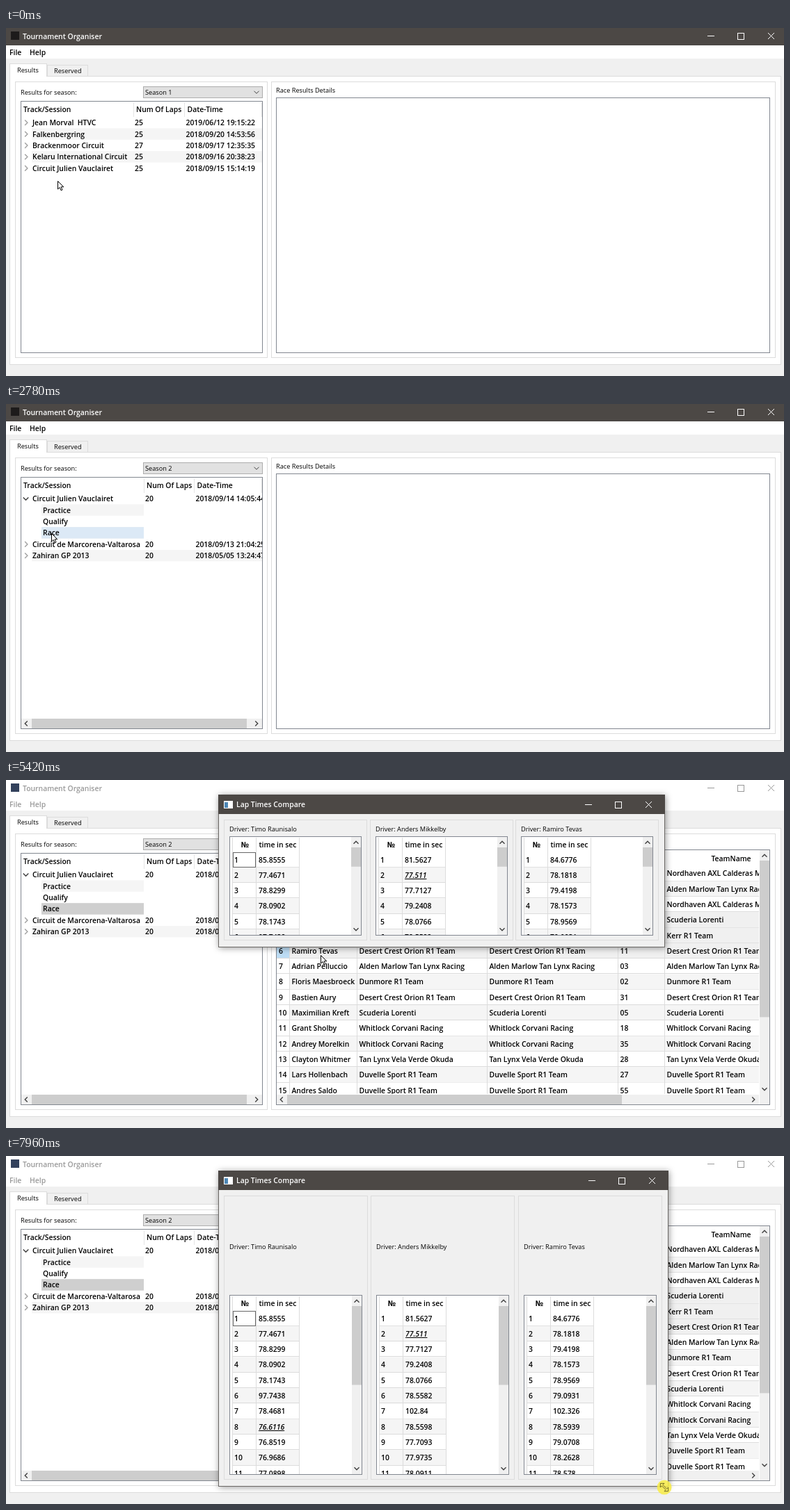
These frames come from a looping animation (1118 px wide and 501 px high, 8000 ms). An HTML page with a canvas:

```html
<!DOCTYPE html>
<html lang="en">
<head>
<meta charset="utf-8">
<title>Race results</title>
<style>
html, body { margin: 0; width: 100%; height: 100%; overflow: hidden; background: #f0f0f0; }
canvas { display: block; }
</style>
</head>
<body>
<canvas id="stage" width="1118" height="501"></canvas>
<script>
const ctx = document.getElementById('stage').getContext('2d');
const LOOP = 8000;
const BLUE = '#0078d7', FRAME = '#828790', GRID = '#dcdcdc', BAR = '#4c4845', ALT = '#f5f5f5', FACE = '#f0f0f0';
const UI = '600 10.4px "Open Sans", "Noto Sans", sans-serif';
const BOLD = '700 11px "Open Sans", "Noto Sans", sans-serif';
const FAST = 'italic ' + UI;
const SMALL = '9.2px "Open Sans", "Noto Sans", sans-serif';

// Moments of the hard changes
const AT = { popup: 840, season2: 1380, expand: 2240, results: 3030, select: 3580,
  menu: 4740, dialog: 5120, sideCursor: 6300, cornerCursor: 6800, drag: 7200 };

// Keys: time, x, y
const CURSOR = [[0, 74, 220], [70, 74, 220], [500, 150, 148], [765, 208, 92], [920, 208, 98], [1070, 209, 117],
  [1380, 210, 117], [1920, 26, 134], [2480, 26, 134], [2780, 65, 186], [2980, 65, 186], [3260, 458, 226],
  [3410, 418, 214], [3580, 418, 205], [3880, 409, 240], [4430, 409, 240], [4700, 450, 220], [4960, 455, 224],
  [5660, 450, 267], [5890, 450, 267], [6350, 949, 239], [6730, 949, 239], [6890, 941, 242]];
const CORNER = [[7200, 946, 240], [7430, 925, 360], [7700, 957, 430], [7960, 951, 475]];

const SEASON1 = [['Jean Morval  HTVC', 25, '2019/06/12 19:15:22'], ['Falkenbergring', 25, '2018/09/20 14:53:56'],
  ['Brackenmoor Circuit', 27, '2018/09/17 12:35:35'], ['Kelaru International Circuit', 25, '2018/09/16 20:38:23'],
  ['Circuit Julien Vauclairet', 25, '2018/09/15 15:14:19']];
const SEASON2 = [['Circuit Julien Vauclairet', 20, '2018/09/14 14:05:44'],
  ['Circuit de Marcorena-Valtarosa', 20, '2018/09/13 21:04:25'], ['Zahiran GP 2013', 20, '2018/05/05 13:24:47']];
const SESSIONS = ['Practice', 'Qualify', 'Race'];

const TEAMS = { n: 'Nordhaven AXL Calderas Motorsport', a: 'Alden Marlow Tan Lynx Racing', s: 'Scuderia Lorenti',
  k: 'Kerr R1 Team', o: 'Desert Crest Orion R1 Team', d: 'Dunmore R1 Team', w: 'Whitlock Corvani Racing',
  t: 'Tan Lynx Vela Verde Okuda', v: 'Duvelle Sport R1 Team' };
const DRIVERS = `Ellis Hartwood,n,44|Jan Oosterveen,a,33|Juhana Lehtola,n,77|Timo Raunisalo,s,07|Anders Mikkelby,k,20
|Ramiro Tevas,o,11|Adrian Pelluccio,a,03|Floris Maesbroeck,d,02|Bastien Aury,o,31|Maximilian Kreft,s,05|Grant Sholby,w,18
|Andrey Morelkin,w,35|Clayton Whitmer,t,28|Lars Hollenbach,v,27|Andres Saldo,v,55`.split('|').map(row => row.trim().split(','));
const LAPS = [
  '85.8555 77.4671 78.8299 78.0902 78.1743 97.7438 78.4681 76.6116 76.8519 76.9686 77.0898',
  '81.5627 77.511 77.7127 79.2408 78.0766 78.5582 102.84 78.5598 77.7093 77.9735 78.0911',
  '84.6776 78.1818 79.4198 78.1573 78.9569 79.0931 102.326 78.5939 79.0708 78.2628 78.578'
].map(list => list.split(' '));
const FASTEST = ['76.6116', '77.511', ''];

function at(keys, t) {
  let i = keys.findIndex(key => key[0] > t);
  if (i < 0) return keys[keys.length - 1].slice(1);
  if (i === 0) return keys[0].slice(1);
  const [t0, x0, y0] = keys[i - 1], [t1, x1, y1] = keys[i];
  const k = (t - t0) / (t1 - t0);
  return [x0 + (x1 - x0) * k, y0 + (y1 - y0) * k];
}

function fill(x, y, w, h, color) {
  ctx.fillStyle = color;
  ctx.fillRect(x, y, w, h);
}

function box(x, y, w, h, border, color) {
  if (color) fill(x, y, w, h, color);
  ctx.strokeStyle = border;
  ctx.lineWidth = 1;
  ctx.strokeRect(Math.round(x) + .5, Math.round(y) + .5, Math.round(w) - 1, Math.round(h) - 1);
}

function poly(points, color, width = 1) {
  ctx.beginPath();
  points.forEach(p => ctx.lineTo(...p));
  ctx.strokeStyle = color;
  ctx.lineWidth = width;
  ctx.stroke();
}

// Text centred vertically on y
function text(string, x, y, color = '#000', font = UI, align = 'left') {
  ctx.font = font;
  ctx.fillStyle = color;
  ctx.textAlign = align;
  ctx.fillText(string, x, y + (font === SMALL ? 3.3 : 3.8));
}

function clipped(x, y, w, h, paint) {
  ctx.save();
  ctx.beginPath();
  ctx.rect(x, y, w, h);
  ctx.clip();
  paint();
  ctx.restore();
}

function shadowed(x, y, w, h, color, blur, offset) {
  ctx.save();
  ctx.shadowColor = 'rgba(0,0,0,.4)';
  ctx.shadowBlur = blur;
  ctx.shadowOffsetX = ctx.shadowOffsetY = offset;
  fill(x, y, w, h, color);
  ctx.restore();
}

function chevron(x, y, angle, color = '#404040', size = 3.5, width = 1.4) {
  ctx.save();
  ctx.translate(x, y);
  ctx.rotate(angle * Math.PI / 2);
  poly([[-size / 2, -size], [size / 2, 0], [-size / 2, size]], color, width);
  ctx.restore();
}

function hScroll(x, y, w, from, to) {
  fill(x, y, w, 14, FACE);
  fill(from, y, to - from, 14, '#cdcdcd');
  chevron(x + 7, y + 7, 2);
  chevron(x + w - 8, y + 7, 0);
}

function vScroll(x, y, h, part) {
  fill(x, y, 14, h, FACE);
  fill(x, y + 15, 14, (h - 30) * part, '#cdcdcd');
  chevron(x + 7, y + 8, 3);
  chevron(x + 7, y + h - 8, 1);
}

function windowButtons(right, y, color) {
  fill(right - 114, y, 10, 1, color);
  box(right - 71, y - 4, 10, 10, color);
  poly([[right - 27, y - 4], [right - 18, y + 5]], color);
  poly([[right - 18, y - 4], [right - 27, y + 5]], color);
}

function drawWindow(active) {
  const ink = active ? '#fff' : '#999';
  fill(0, 0, 1118, 501, FACE);
  fill(0, 0, 1118, 25, active ? BAR : '#fff');
  fill(7, 5, 12, 12, active ? '#1d1b1b' : '#33415c');
  text('Tournament Organiser', 24, 12, ink);
  windowButtons(1122, 11, ink);
  fill(0, 25, 1118, 19, '#fff');
  text('File', 5, 35.5, active ? '#000' : '#999');
  text('Help', 34, 35.5, active ? '#000' : '#999');
  box(5, 69, 1109, 416, GRID, '#fff');
  box(59, 53, 59, 17, GRID, FACE);
  box(5, 51, 54, 19, GRID, '#fff');
  fill(6, 69, 52, 2, '#fff');
  text('Results', 16, 60.5, '#000', SMALL);
  text('Reserved', 69, 61.5, '#000', SMALL);
  box(13, 77, 363, 398, GRID);
  box(381, 77, 725, 398, GRID);
  text('Results for season:', 21, 92.5, '#000', SMALL);
  text('Race Results Details', 388, 90, '#000', SMALL);
}

function drawCombo(t) {
  const hot = t >= 720 && t < AT.season2;
  box(197, 84, 172, 17, hot ? BLUE : '#adadad', hot ? '#d9e9f7' : '#e1e1e1');
  text(t < AT.season2 ? 'Season 1' : 'Season 2', 200, 92.5, '#000', SMALL);
  chevron(360, 92.5, 1, '#404040', 3.5, 1);
}

function drawPopup(mouseY) {
  shadowed(197, 101, 171, 24, '#fff', 3, 2);
  box(197, 100, 172, 25, '#555', '#fff');
  const second = mouseY > 111;
  fill(198, second ? 112 : 101, 170, 12, BLUE);
  text('Season 1', 200, 106.5, second ? '#000' : '#fff', SMALL);
  text('Season 2', 200, 118.5, second ? '#fff' : '#000', SMALL);
}

function drawTree(t, mouse) {
  const late = t >= AT.season2, open = t >= AT.expand;
  const split = late ? 198 : 183, split2 = late ? 270 : 256;
  const rows = (late ? SEASON2 : SEASON1).map(([name, laps, date]) => ({ name, laps, date }));
  if (open) rows.splice(1, 0, ...SESSIONS.map(name => ({ name, child: true })));
  box(21, 105, 348, 363, FRAME, '#fff');
  clipped(22, 106, 346, 361, () => {
    text('Track/Session', 25, 117.5);
    text('Num Of Laps', split + 4, 117.5);
    text('Date-Time', split2 + 4.5, 117.5);
    for (const x of [split, split2, 367]) fill(x, 107, 1, 21, '#e5e5e5');
    rows.forEach((row, i) => {
      const top = 128 + 16.4 * i, y = top + 8.3, left = row.child ? 51 : 37;
      const hover = t < AT.results && !(t >= AT.popup && t < AT.season2) &&
        mouse[0] > 22 && mouse[0] < split && mouse[1] >= top && mouse[1] < top + 16.4;
      if (i % 2) fill(left, top, (row.child ? split : 368) - left, 16.4, ALT);
      if (hover) fill(left, top, split - left, 16.4, '#dce9f6');
      if (row.name === 'Race' && t >= AT.results) fill(left, top, split - left, 16.4, t < AT.select ? '#cce8ff' : '#cfcfcf');
      text(row.name, row.child ? 53 : 38, y);
      if (row.child) return;
      text(row.laps, split + 2, y);
      text(row.date, split2 + 2.5, y);
      if (open && i === 0) chevron(28.5, y, 1, '#404040', 3.8);
      else chevron(29, y, 0, '#a0a0a0', 3.8);
    });
    if (late) hScroll(22, 453, 346, 37, 346);
  });
}

function drawResults(t) {
  box(388, 100, 710, 368, FRAME, '#fff');
  if (t < AT.results) return;
  const edges = [408, 505, 692, 880, 947, 1137];
  const heads = ['Name', 'CarType', 'CarClass', 'CarNumber', 'TeamName'];
  const chosen = t < AT.select ? 0 : Math.min(3, 1 + Math.floor((t - AT.select) / 150));
  const active = t < AT.dialog;
  clipped(389, 101, 693, 351, () => {
    heads.forEach((head, c) => text(head, (edges[c] + edges[c + 1]) / 2, 113, '#000', UI, 'center'));
    DRIVERS.forEach(([name, team, number], r) => {
      const top = 123.3 + 22.3 * r, y = top + 11.2;
      const selected = r >= 3 && r < 3 + chosen;
      fill(408, top, 674, 22.3, selected ? (active ? BLUE : FACE) : r % 2 ? ALT : '#fff');
      if (selected) fill(389, top, 19, 22.3, '#bcdcf4');
      fill(389, Math.round(top + 21.3), 693, 1, GRID);
      text(r + 1, r < 9 ? 395 : 397.5, y, '#000', UI, 'center');
      const ink = selected && active ? '#fff' : '#000';
      [name, TEAMS[team], TEAMS[team], number, TEAMS[team]].forEach((value, c) =>
        clipped(edges[c], top, edges[c + 1] - edges[c] - 2, 22, () => text(value, edges[c] + 2.5, y, ink)));
    });
    edges.forEach(x => fill(x - 1, 102, 1, 350, GRID));
  });
  hScroll(389, 453, 693, 404, 885);
  vScroll(1083, 101, 352, .7);
  fill(1083, 453, 14, 14, FACE);
}

function drawMenu(t) {
  shadowed(450, 220, 187, 38, FACE, 4, 2);
  box(450, 220, 188, 39, '#b0b0b0', FACE);
  if (t >= 4800) fill(453, 222, 182, 17.5, '#91c9f7');
  text('Compare selected lapsTimes', 478, 231);
  text('Clear selection', 478, 249);
}

function drawLaps(index, x, y, w, h) {
  const view = h - 2, vis = Math.floor((h - 24) / 22.3);
  box(x, y, w, h, FRAME, '#fff');
  clipped(x + 1, y + 1, w - 2, view, () => {
    text('№', x + 22.5, y + 12.5, '#000', BOLD, 'center');
    text('time in sec', x + 69.5, y + 12.5, '#000', UI, 'center');
    LAPS[index].forEach((lap, r) => {
      const top = y + 22.5 + 22.3 * r, mid = top + 11.2;
      if (r % 2) fill(x + 4, top, 96, 22.3, ALT);
      fill(x + 4, Math.round(top + 21.3), 97, 1, GRID);
      text(r + 1, x + 7, mid);
      const fast = lap === FASTEST[index];
      text(lap, x + 42, mid, '#000', fast ? FAST : UI);
      if (fast) fill(x + 42, Math.round(mid + 5), ctx.measureText(lap).width, 1, '#000');
    });
    for (const dx of [4, 38, 100]) fill(Math.round(x + dx), y + 2, 1, view, GRID);
    if (index === 0) box(x + 5, y + 23, 33, 22, '#666');
    vScroll(x + w - 15, y + 1, view, vis / 20);
  });
}

function drawDialog(right, bottom) {
  const left = 305, top = 21, width = right - left + 1, height = bottom - top + 1;
  shadowed(left, top, width, height, FACE, 9, 1);
  box(left, top, width, height, '#6b6865', FACE);
  fill(left, top, width, 28, BAR);
  fill(313, 30, 13, 11, '#fff');
  fill(314, 32, 5, 8, '#4d87b5');
  text('Lap Times Compare', 331, 35.5, '#fff');
  windowButtons(right, 35, '#fff');
  const groupWidth = (right - 329) / 3, space = bottom - 77;
  // The label takes its share only once the table has its preferred height
  const tableTop = Math.round(61 + Math.max(20, Math.min(space - 143, .35 * space)));
  for (let i = 0; i < 3; i++) {
    const x = Math.round(313 + i * (groupWidth + 4));
    box(x, 57, groupWidth, bottom - 66, GRID);
    text('Driver: ' + DRIVERS[3 + i][0], x + 8, (61 + tableTop) / 2, '#000', SMALL);
    drawLaps(i, x + 8, tableTop, Math.round(groupWidth - 16), Math.round(bottom - 16 - tableTop));
  }
}

function drawArrow(x, y) {
  ctx.save();
  ctx.translate(x + .5, y + .5);
  const outline = new Path2D('M0 0V11.5L2.7 9 4.6 13.3 6.5 12.5 4.6 8.3H8.3Z');
  ctx.fillStyle = '#fff';
  ctx.fill(outline);
  ctx.strokeStyle = '#000';
  ctx.lineWidth = 1;
  ctx.stroke(outline);
  ctx.restore();
}

function drawResize(x, y, angle, glow) {
  ctx.save();
  ctx.translate(x, y);
  if (glow) {
    ctx.beginPath();
    ctx.arc(0, 0, 10.5, 0, 7);
    ctx.fillStyle = 'rgba(248,236,70,.85)';
    ctx.fill();
  }
  ctx.rotate(angle);
  const outline = new Path2D('M-8 0L-4-4V-1H4V-4L8 0 4 4V1H-4V4Z');
  ctx.fillStyle = glow ? '#f8ec60' : '#fff';
  ctx.fill(outline);
  ctx.strokeStyle = glow ? '#6b6420' : '#000';
  ctx.lineWidth = .9;
  ctx.stroke(outline);
  ctx.restore();
}

function draw(t) {
  const corner = at(CORNER, t).map(Math.round);
  const dragging = t >= AT.drag;
  const mouse = dragging ? [corner[0] - 5, corner[1] + 2] : at(CURSOR, t).map(Math.round);
  drawWindow(t < AT.dialog);
  drawCombo(t);
  drawTree(t, mouse);
  drawResults(t);
  if (t >= AT.popup && t < AT.season2) drawPopup(mouse[1]);
  if (t >= AT.menu && t < AT.dialog - 80) drawMenu(t);
  if (t >= AT.dialog) drawDialog(...corner);
  if (t >= AT.cornerCursor) drawResize(...mouse, Math.PI / 4, dragging);
  else if (t >= AT.sideCursor) drawResize(...mouse, 0, false);
  else drawArrow(...mouse);
}

const start = performance.now();
function tick() {
  draw((performance.now() - start) % LOOP);
  requestAnimationFrame(tick);
}
tick();
</script>
</body>
</html>
```
